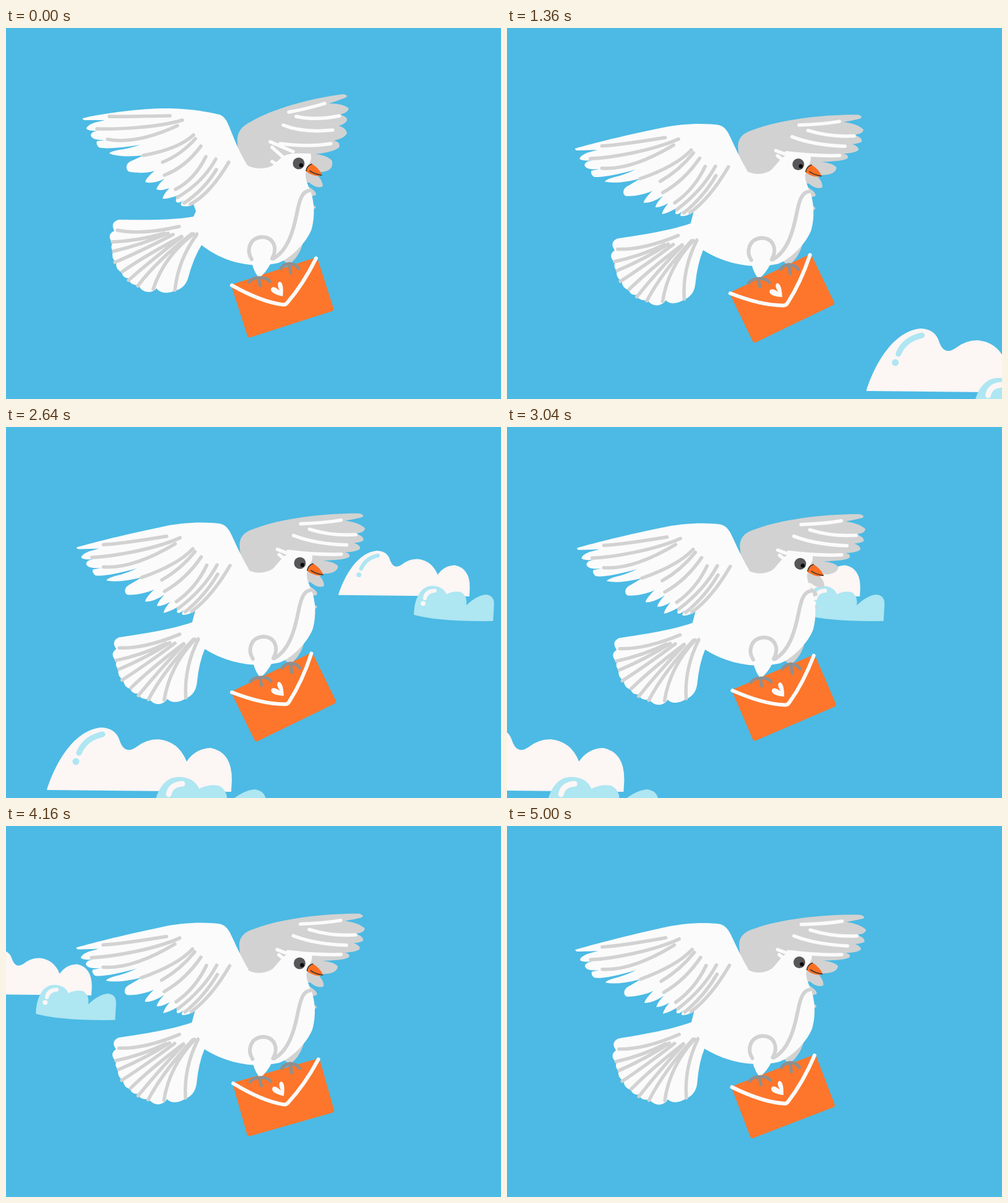
Animation of 800x600 px, one loop 5040 ms. Source, as an HTML page with a canvas:

```html
<!DOCTYPE html>
<html lang="en">
<head>
<meta charset="utf-8">
<title>Dove with a letter</title>
<style>
html, body { margin: 0; width: 100%; height: 100%; overflow: hidden; background: #4cbae4; }
canvas { display: block; width: 800px; height: 600px; }
</style>
</head>
<body>
<canvas id="stage" width="800" height="600"></canvas>
<script>
const ctx = document.getElementById('stage').getContext('2d');
const LOOP = 5040, STEP = 40, FLAP = 400;
const SKY = '#4cbae4', WHITE = '#fbfbfb', GREY = '#d2d2d2', FOOT = '#8f8f8f';
const ORANGE = '#fd762b', CLOUD = '#fcf6f5', MIST = '#aee6f2', DARK = '#3c3634';

// time, drift x, drift y, letter angle in degrees
const SWAY = [
  [0, 0, 0, -17.8], [760, -1, -0.5, -20.1], [1920, -2.5, 3, -30], [2640, 2, 1, -26],
  [3440, -0.5, 3.5, -20.4], [4160, 1.5, 3, -15.8], [5000, -0.5, 1.5, -21]
];

const nearWing = `M124 146 C150 139 210 131 250 130 C290 129 325 135 345 140 C353 143 357 150 361 160
  C370 183 378 202 390 222 L400 300 L310 305 L303 285 Q292 291 283 287 Q281 284 287 278
  Q279 285 275 281 Q273 278 279 270 Q262 277 253 276 Q255 268 264 259 Q250 264 243 261
  Q246 252 256 244 Q236 253 225 249 Q226 243 240 231 C225 236 205 234 198 232
  C192 227 194 217 205 214 L222 206 Q185 210 167 203 Q168 199 190 196 Q205 193 216 189
  C185 194 160 196 150 193 Q145 188 147 183 L160 181 Q138 182 137 173 Q138 167 150 166
  Q134 167 130 163 Q130 158 143 153 L160 149 Q135 149 126 149 Q123 147 124 146Z`;
const nearLines = `M167 143 C195 144 240 142 265 142 M147 163 C180 164 245 161 285 149
  M164 180 C200 187 240 175 277 158 M222 206 C255 200 285 190 303 173
  M253 217 Q283 205 306 179 M256 238 Q290 225 315 191 M274 261 Q305 245 323 208
  M277 274 Q318 250 339 212 M288 283 Q320 262 340 229 M298 285 Q330 268 360 217`;

const farWing = `M374 185 C373 172 378 160 395 152 C430 131 490 114 545 107 Q555 109 548 113
  Q535 118 522 122 Q545 122 554 130 Q552 138 538 140 Q553 143 551 150 Q547 156 538 158
  Q550 162 551 170 Q548 178 530 182 Q540 184 539 192 Q533 200 500 204
  Q520 206 527 215 Q530 232 508 233 L503 238 Q512 247 512 256 Q503 261 490 250
  L470 250 L400 250 L380 220 Q375 205 374 185Z`;
const farTufts = 'M488 256 Q502 264 501 270 L492 273Z M493 282 L501 290 L497 294Z';
const farLines = `M457 136 Q490 130 515 122 M469 143 Q500 150 539 142 M448 157 Q480 170 528 165
  M443 187 Q490 193 525 187 M427 184 L464 200 M430 193 L447 208 M430 216 L438 221`;

const tail = `M303 305 C265 312 210 310 182 310 Q168 314 175 328 Q162 334 172 348 Q168 355 173 361
  Q169 372 178 379 Q177 391 187 395 Q188 404 198 405 Q200 416 214 416 Q220 428 232 427
  Q240 426 243 421 Q252 433 273 425 Q290 421 295 402 Q303 372 316 351 L360 330Z`;
const tailLines = `M180 327 Q220 335 280 321 M172 346 Q215 344 256 332 M174 361 Q220 350 262 332
  M176 379 Q220 360 270 334 M188 394 Q225 368 284 337 M198 408 Q235 375 284 338
  M213 417 Q245 375 300 333 M238 422 Q255 370 303 333 M273 424 Q278 375 309 333`;

const body = `M303 305 L312 285 L390 222 C400 228 418 229 430 223 L447 208 C458 201 475 203 492 203
  C495 210 492 218 488 222 L484 237 C484 245 488 255 492 263 C498 280 500 303 494 325
  C487 345 462 372 440 380 C395 390 350 378 316 351Z`;
const bodyLines = `M490 263 C478 264 474 280 470 300 C464 330 455 360 432 373
  M397 374 C388 360 393 340 413 338 C432 338 440 355 430 373`;

const bigCloud = `M0 587 C15 540 45 490 88 486 Q112 487 118 508 Q126 530 144 518 Q160 505 180 505
  Q213 508 226 541 Q240 520 265 519 Q300 526 299 572 L298 590Z`;
const smallCloud = `M172 632 C172 600 185 566 213 566 Q238 566 246 585 Q262 577 278 580
  Q294 588 291 610 Q315 588 335 586 Q356 588 354 610 L352 646 Q230 648 172 632Z`;

const clamp = (v, lo = 0, hi = 1) => Math.min(hi, Math.max(lo, v));

// Moves every point of a path through a bend function
const bent = (d, bend) => bend
  ? d.replace(/(-?[\d.]+) (-?[\d.]+)/g, (_, x, y) => bend(+x, +y).map(v => v.toFixed(2)).join(' '))
  : d;

function fill(d, color, bend) {
  ctx.fillStyle = color;
  ctx.fill(new Path2D(bent(d, bend)));
}

function line(d, color, width, bend) {
  ctx.strokeStyle = color;
  ctx.lineWidth = width;
  ctx.stroke(new Path2D(bent(d, bend)));
}

function dot(x, y, r, color) {
  ctx.fillStyle = color;
  ctx.beginPath();
  ctx.arc(x, y, r, 0, 2 * Math.PI);
  ctx.fill();
}

function placed(x, y, angle, scale, draw) {
  ctx.save();
  ctx.translate(x, y);
  ctx.rotate(angle);
  ctx.scale(scale, scale);
  draw();
  ctx.restore();
}

// Smooth curve through the sway table
function sway(t) {
  let i = 0;
  while (i < SWAY.length - 2 && t >= SWAY[i + 1][0]) i++;
  const a = SWAY[i], b = SWAY[i + 1], span = b[0] - a[0], u = (t - a[0]) / span;
  const slope = (k, c) => {
    const p = SWAY[Math.max(k - 1, 0)], n = SWAY[Math.min(k + 1, SWAY.length - 1)];
    return (n[c] - p[c]) / (n[0] - p[0]) * span;
  };
  return [1, 2, 3].map(c =>
    (2 * u ** 3 - 3 * u * u + 1) * a[c] + (u ** 3 - 2 * u * u + u) * slope(i, c) +
    (3 * u * u - 2 * u ** 3) * b[c] + (u ** 3 - u * u) * slope(i + 1, c));
}

// How each part bends at flap position q, from 0 (up) to 1 (down)
function bends(q) {
  const turn = (x, y, w = 1) => {
    const a = -0.18 * q * w, c = Math.cos(a), s = Math.sin(a), dx = x - 360, dy = y - 335;
    return [360 + dx * c - dy * s, 335 + dx * s + dy * c];
  };
  return {
    near(x, y) {
      const root = 365 - 0.45 * (y - 140) - 2.5 * Math.max(0, 142 - y);
      const s = Math.sin(Math.PI / 2 * clamp((root - x) / 235, -0.1));
      return [x - 13 * q * Math.max(s, 0) * clamp(1 - (y - 146) / 150), y + q * (13 + 39.5 * s)];
    },
    far(x, y) {
      const g = q * clamp(1 - Math.max(y - 150, 0) / 95 * clamp((x - 380) / 100));
      return [x + 27 * g * clamp((x - 365) / 130), y + g * (9 + 26 * (x - 374) / 170)];
    },
    tail: (x, y) => turn(x, y),
    body(x, y) {
      if (y > 260) return turn(x, y, clamp((360 - x) / 44));
      return [x, y + 9 * q * clamp((447 - x) / 30) * clamp((260 - y) / 30)];
    }
  };
}

function clouds(x, y, scale) {
  placed(x, y - 486 * scale, 0, scale, () => {
    fill(bigCloud, CLOUD);
    line('M52 527 Q62 503 90 497', MIST, 9);
    dot(47, 541, 5.5, MIST);
    fill(smallCloud, MIST);
    line('M197 594 Q200 578 219 577', CLOUD, 9);
    dot(193, 606, 5.5, CLOUD);
  });
}

function letter(angle) {
  placed(447, 436, angle * Math.PI / 180, 1, () => {
    ctx.fillStyle = ORANGE;
    ctx.beginPath();
    ctx.roundRect(-73, -45.3, 146, 90.6, 4);
    ctx.fill();
    line('M-72 -44 Q-35 -4 -3 11 Q1 13 5 10 Q38 -10 71 -44', WHITE, 6);
    fill('M1 -2 C-10 -8 -17 -15 -13 -20 Q-8 -24 -1 -12 Q-3 -25 3 -26 Q10 -23 1 -2Z', WHITE);
  });
}

function bird(q) {
  const b = bends(q);
  fill('M481 343 L447 374 Q452 380 458 382 Q476 368 481 343Z', GREY);
  line('M444 389 Q449 382 458 381 Q469 382 473 389 M458 381 L460 396', FOOT, 5);
  fill(farWing, GREY, b.far);
  fill(farTufts, GREY);
  line(farLines, WHITE, 5.5, b.far);
  fill(tail, WHITE, b.tail);
  line(tailLines, GREY, 5.5, b.tail);
  fill(body, WHITE, b.body);
  fill(nearWing, WHITE, b.near);
  line(nearLines, GREY, 5.5, b.near);

  fill('M395 368 Q398 390 407 402 Q410 404 414 400 Q426 388 432 370Z', WHITE);
  line('M393 411 Q398 404 408 404 Q421 403 426 410 M408 404 L411 417', FOOT, 5);
  line(bodyLines, GREY, 6);

  dot(473, 219, 9.5, '#57575a');
  dot(477, 222, 3.2, '#0c0c0c');
  fill('M485 230 Q488 219 495 220 Q506 227 511 238 Q499 242 485 232Z', '#fb6f22');
  line('M494 220 Q486 223 485 231', DARK, 1.6);
  line('M491 231 Q498 236 510 238', DARK, 1.6);
}

function draw(t) {
  const q = (1 - Math.cos(2 * Math.PI * t / FLAP)) / 2;
  const glide = Math.sin(5.54e-4 * (t - 2680));
  const [dx, dy, angle] = sway(t);
  ctx.lineCap = ctx.lineJoin = 'round';
  ctx.fillStyle = SKY;
  ctx.fillRect(0, 0, 800, 600);
  clouds(48.3 - 797 * glide, 486, 1);
  clouds(519 - 811 * glide, 200, 0.711);
  placed(dx, dy, 0, 1, () => {
    letter(angle);
    bird(q);
  });
}

const start = performance.now();
function tick() {
  const t = (performance.now() - start) % LOOP;
  draw(Math.floor(t / STEP) * STEP);
  requestAnimationFrame(tick);
}
tick();
</script>
</body>
</html>
```
